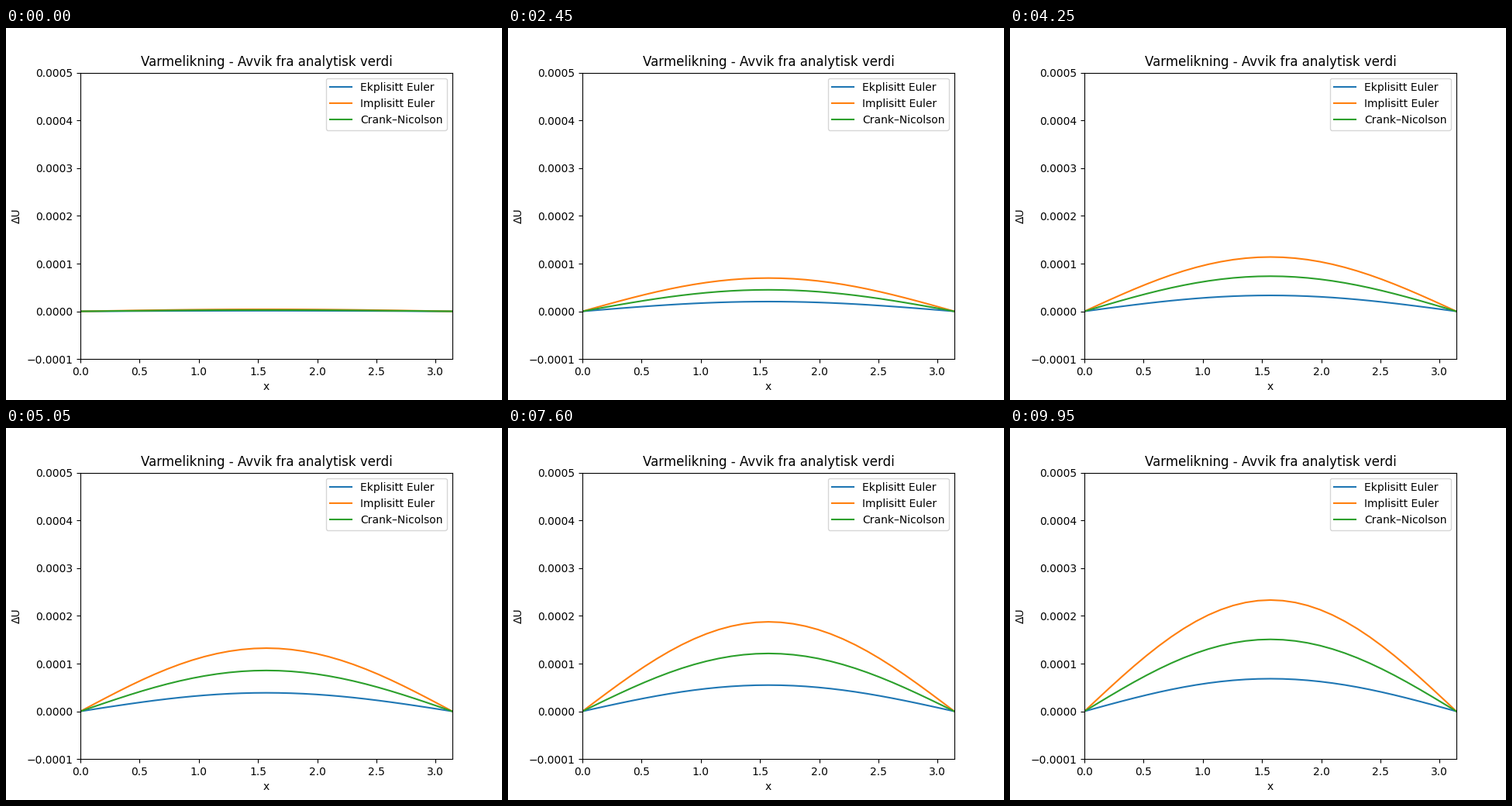
Write a matplotlib script that moves like this. It is 640x480 px and loops after 10 s.

```python
import numpy as np
import matplotlib.pyplot as plt
from matplotlib.animation import FuncAnimation

FRAMES = 200
INTERVAL = 50      # ms
CELLS = 30
DT = 0.001
FIRST_STEP = 3     # time steps already taken when the animation starts

x = np.linspace(0, np.pi, CELLS + 1)
dx = np.pi / CELLS

# sin(x) is an eigenvector of the discrete Laplacian, so each scheme
# multiplies it by a constant factor per time step.
lam = (2 - 2 * np.cos(dx)) / dx**2
schemes = {
    "Ekplisitt Euler": 1 - DT * lam,
    "Implisitt Euler": 1 / (1 + DT * lam),
    "Crank–Nicolson": (1 - DT * lam / 2) / (1 + DT * lam / 2),
}


def deviation(factor, step):
    """Numerical minus analytic solution of the heat equation."""
    return (factor**step - np.exp(-DT * step)) * np.sin(x)


fig, ax = plt.subplots(figsize=(6.4, 4.8), dpi=100)
fig.subplots_adjust(left=0.15)
ax.set_xlim(0, np.pi)
ax.set_ylim(-0.0001, 0.0005)
ax.set_title("Varmelikning - Avvik fra analytisk verdi")
ax.set_xlabel("x")
ax.set_ylabel("ΔU")
lines = [ax.plot(x, deviation(factor, FIRST_STEP), label=name)[0]
         for name, factor in schemes.items()]
ax.legend(loc="upper right")


def update(frame):
    for line, factor in zip(lines, schemes.values()):
        line.set_ydata(deviation(factor, frame + FIRST_STEP))
    return lines


anim = FuncAnimation(fig, update, frames=FRAMES, interval=INTERVAL,
                     repeat=True, repeat_delay=0)
plt.show()
```
